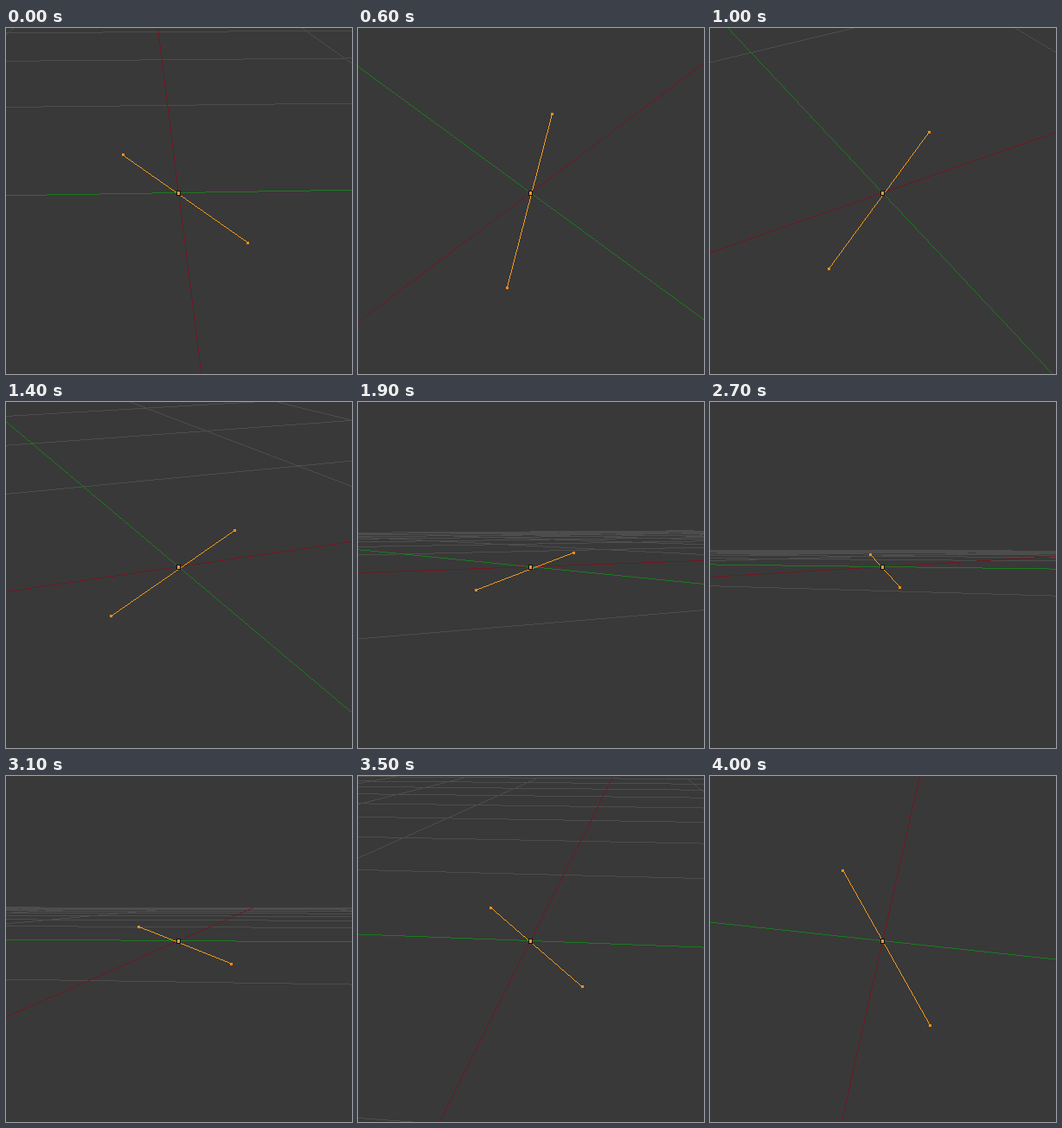
Animation, 400 px wide and 400 px high, one loop 4100 ms. Source, as an HTML page with a canvas:

```html
<!DOCTYPE html>
<html lang="en">
<head>
<meta charset="utf-8">
<title>Orbiting a line in a 3D viewport</title>
<style>
  html, body { margin: 0; width: 100%; height: 100%; overflow: hidden; background: #393939; }
  canvas { display: block; }
</style>
</head>
<body>
<canvas id="view" width="400" height="400"></canvas>
<script>
const ctx = document.getElementById('view').getContext('2d');
const LOOP = 4100, STEP = 100, SIZE = 400;
const CX = 199, CY = 190, FOCAL = 830, DIST = 2.02, NEAR = 0.05;
const GRID = 8;
const HEAD = [-0.2584, -0.1625, 0.0294], TAIL = [0.2516, 0.1635, -0.0406];

// Camera orbit: time in ms, azimuth and elevation in degrees
const ORBIT = [
  [0, -2.6, 21.1],
  [600, 44.65, 47.8],
  [1400, 67.5, 20.4],
  [1900, 59.2, 3.4],
  [2300, 56, -1.87],
  [2400, 50, -0.5],
  [2700, 25, 1.6],
  [3000, 9.2, 3.2],
  [3100, 7.4, 3.3],
  [4000, 8.85, 43.7]
];

const slope = (i, k) => (ORBIT[i + 1][k] - ORBIT[i][k]) / (ORBIT[i + 1][0] - ORBIT[i][0]);

// Monotone tangent: harmonic mean of the neighbouring slopes
function tangent(i, k) {
  if (i === 0) return slope(0, k);
  if (i === ORBIT.length - 1) return slope(i - 1, k);
  const a = slope(i - 1, k), b = slope(i, k);
  return a * b > 0 ? 2 * a * b / (a + b) : 0;
}

function orbitAt(t, k) {
  let i = 0;
  while (i < ORBIT.length - 2 && t > ORBIT[i + 1][0]) i++;
  const p = ORBIT[i], q = ORBIT[i + 1], w = q[0] - p[0];
  const u = (t - p[0]) / w, v = 1 - u;
  return p[k] * (1 + 2 * u) * v * v + q[k] * u * u * (3 - 2 * u)
    + w * u * v * (tangent(i, k) * v - tangent(i + 1, k) * u);
}

function makeCamera(t) {
  const a = orbitAt(t, 1) * Math.PI / 180, e = orbitAt(t, 2) * Math.PI / 180;
  const ca = Math.cos(a), sa = Math.sin(a), ce = Math.cos(e), se = Math.sin(e);
  return ([x, y, z]) => [
    -sa * x + ca * y,
    -se * (ca * x + sa * y) + ce * z,
    DIST - ce * (ca * x + sa * y) - se * z
  ];
}

const project = ([x, y, z]) => [CX + FOCAL * x / z, CY - FOCAL * y / z];

function clipNear(p, q) {
  if (p[2] >= NEAR) return p;
  const k = (NEAR - p[2]) / (q[2] - p[2]);
  return p.map((v, i) => v + (q[i] - v) * k);
}

// Hard-edged one-pixel line, stepped along its longer axis
function pixelLine(a, b, color) {
  const m = Math.abs(b[0] - a[0]) >= Math.abs(b[1] - a[1]) ? 0 : 1;
  if (a[m] > b[m]) [a, b] = [b, a];
  const rise = (b[1 - m] - a[1 - m]) / (b[m] - a[m] || 1);
  const last = Math.min(SIZE - 1, Math.round(b[m]));
  ctx.fillStyle = color;
  for (let i = Math.max(0, Math.round(a[m])); i <= last; i++) {
    const j = Math.round(a[1 - m] + (i - a[m]) * rise);
    ctx.fillRect(m ? j : i, m ? i : j, 1, 1);
  }
}

function line(cam, from, to, color) {
  const p = cam(from), q = cam(to);
  if (p[2] < NEAR && q[2] < NEAR) return;
  pixelLine(project(clipNear(p, q)), project(clipNear(q, p)), color);
}

function box(x, y, w, h, color) {
  ctx.fillStyle = color;
  ctx.fillRect(Math.round(x), Math.round(y), w, h);
}

function draw(t) {
  const cam = makeCamera(t);
  box(0, 0, SIZE, SIZE, '#393939');

  for (let i = -GRID; i <= GRID; i++) {
    if (!i) continue;
    line(cam, [i, -GRID, 0], [i, GRID, 0], '#4d4d4d');
    line(cam, [-GRID, i, 0], [GRID, i, 0], '#4d4d4d');
  }
  line(cam, [-GRID, 0, 0], [GRID, 0, 0], '#6e1822');
  line(cam, [0, -GRID, 0], [0, GRID, 0], '#1b7a1e');

  line(cam, HEAD, TAIL, '#f79a1c');
  for (const end of [HEAD, TAIL]) {
    const [x, y] = project(cam(end));
    box(x - 1, y - 1, 3, 3, '#ff8a1a');
  }
  box(CX - 2, CY - 2, 5, 6, '#17120c');
  box(CX - 1, CY - 1, 3, 4, '#d99a4a');
}

function tick(now) {
  draw(Math.floor(now % LOOP / STEP) * STEP);
  requestAnimationFrame(tick);
}
draw(0);
requestAnimationFrame(tick);
</script>
</body>
</html>
```
